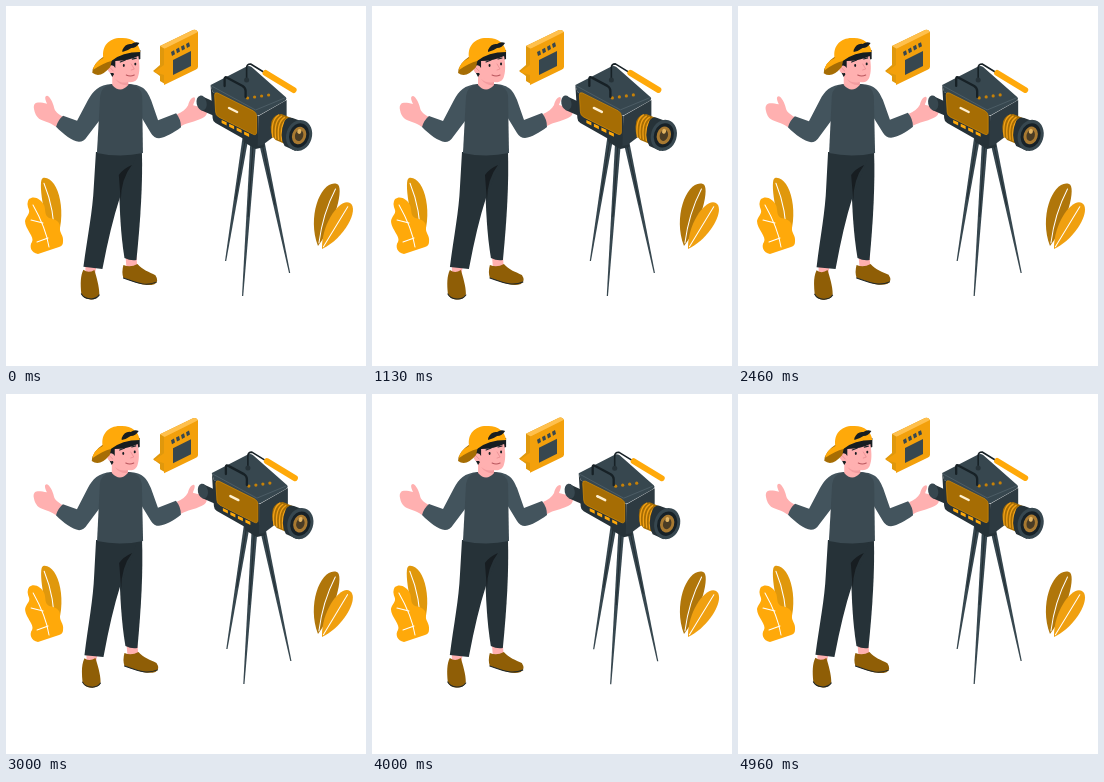
Recreate the animation shown at these times as an HTML page. Size 360x360 px, loop 5 s.

```html
<!DOCTYPE html>
<html lang="en">
<head>
<meta charset="utf-8">
<title>Video maker</title>
<style>
  html, body { margin: 0; width: 100%; height: 100%; overflow: hidden; background: #fff; }
  svg { display: block; width: 100vw; height: 100vh; }
  .amber { fill: #ffa90a; }
  .gold { fill: #e0980c; }
  .brown { fill: #a66d04; }
  .shoe { fill: #8f5e06; }
  .ink { fill: #263238; }
  .slate { fill: #37474f; }
  .shirt { fill: #3b4a52; }
  .sleeve { fill: #43545d; }
  .skin { fill: #ffb0b0; }
  .hair { fill: #171d21; }
  .line { fill: none; stroke-linecap: round; stroke-linejoin: round; }
  .vein { stroke: #fff; stroke-width: 1; }
  .dark { stroke: #1c262b; }
</style>
</head>
<body>
<svg viewBox="0 0 360 360">
  <g id="leftPlant">
    <g id="leftLeaf"></g>
    <path class="amber" d="M23 193C28 189 35 193 38 199C40 204 38 209 43 212C50 213 54 216 54 221C53 227 58 229 57 236Q57 240 53 241L32 248C25 247 23 240 26 236C29 231 19 223 19 215C20 210 24 208 23 204Q20 197 23 193Z"/>
    <path class="line vein" d="M27 199Q40 222 43 241M37 217L25 214M42 232L31 236"/>
  </g>
  <g id="rightPlant"></g>

  <g id="bubble">
    <path class="gold" d="M154 40L187 24Q191 23 192 27L159 78L154 75V70L147 65L154 59Z"/>
    <path fill="#ffc04d" d="M154 40L187 24Q191 23 192 27L159 43Z"/>
    <path fill="#f3a00b" d="M158 43L192 26V61Q192 63 189 64L158 79V69L148 66L158 59Z"/>
    <g class="slate">
      <path d="M167 54L185 45V60L167 69Z"/>
      <g id="slate"></g>
    </g>
  </g>

  <g id="man">
    <path class="skin" d="M80 258L91 260L89 271H80ZM120 249L131 250L132 264L121 262Z"/>
    <path class="shoe" d="M78 264Q83 268 89 264C91 271 94 280 94 288C93 295 79 296 76 288C75 278 75 270 78 264Z"/>
    <path class="shoe" d="M118 259Q125 262 132 258C137 264 144 266 150 269Q154 275 149 278C140 281 130 276 118 272Q116 266 118 259Z"/>
    <path class="line dark" stroke-width="1" d="M76 288C79 294 90 295 94 289M118 272C130 276 140 281 151 276"/>

    <path class="ink" d="M113 146H136C137 176 135 213 131 254Q125 255 119 252C115 228 114 205 113 172Z"/>
    <path class="ink" d="M90 146H131C128 160 119 178 114 192Q105 220 97 263L78 261C82 230 87 205 88 181Z"/>
    <path class="hair" d="M126 159Q117 163 113 169L115 195Q115 173 126 159Z"/>

    <path class="skin" d="M57 111C52 108 49 106 48 102C47 97 44 91 41 90C38 90 39 94 41 98C36 97 31 96 29 98Q27 100 28 104Q29 110 33 113C38 116 43 116 50 121Z"/>
    <path class="sleeve" d="M106 78C92 79 87 85 82 94L71 115L57 110Q52 114 50 121C58 129 66 135 73 136Q78 136 81 131L96 111Z"/>
    <path class="skin" d="M171 108C176 106 180 103 182 99C183 95 185 91 188 91C190 92 188 96 187 99C192 100 198 102 201 105Q201 110 196 112C188 116 182 116 175 120Z"/>
    <path class="sleeve" d="M123 78C138 79 141 85 145 94L152 114L170 107Q175 113 175 121C167 127 160 131 153 132Q148 132 145 127L134 109Z"/>
    <path class="shirt" d="M106 78Q95 80 94 90L91 147Q114 152 137 147L136 90Q135 80 123 78Z"/>
    <path class="skin" d="M106 66V79Q114 88 122 79V70Z"/>
    <path fill="#f39c9f" d="M109 73Q115 78 122 76V79Q114 80 109 73Z"/>

    <path class="hair" d="M101 51Q101 63 106 71L113 60L134 53V44Z"/>
    <path class="skin" d="M109 55Q122 55 132 50C133 56 134 64 132 70C131 75 127 77 122 76C115 75 110 72 107 67C102 68 100 63 103 60Q107 58 109 62Z"/>
    <path class="line" stroke="#e98d91" stroke-width=".8" d="M104 62L107 65M125 58L128 63L125 64"/>
    <path class="line dark" stroke-width="1.2" d="M114 56L119 54M126 53L130 52"/>
    <g class="hair"><ellipse cx="117.5" cy="59.5" rx="1" ry="1.4"/><ellipse cx="129" cy="58" rx="1" ry="1.4"/></g>
    <path class="line" stroke="#b9565d" stroke-width="1" d="M120 69Q124 71 128 69"/>

    <path class="brown" d="M98 50Q86 58 86 67Q94 73 104 61L106 52Z"/>
    <path class="amber" d="M97 52C95 40 103 32 114 32C125 31 133 37 134 46Q116 46 105 55Q97 57 87 64Q87 57 97 52Z"/>
    <path class="hair" d="M116 44Q119 37 125 38Q129 35 133 37Q130 42 125 42Q121 45 116 46Z"/>
  </g>

  <g id="camera">
    <g id="tripod"></g>
    <path class="ink" d="M237 128L258 132L259 141L250 143L238 136Z"/>

    <path class="ink" d="M196 90L211 97V111L195 104Z"/>
    <ellipse class="slate" cx="196" cy="97" rx="5" ry="7.5" transform="rotate(-12 196 97)"/>

    <path class="slate" d="M205 79L240 61Q243 59 246 61L280 91Q282 93 279 95L254 109Q251 110 248 108L207 86Z"/>
    <path class="ink" d="M205 79L207 86L253 110V140L247 138L210 117Q207 115 207 112Z"/>
    <path fill="#2d3a41" d="M253 110L281 94V121L257 139L252 140Z"/>
    <path class="line" stroke="#52636b" stroke-width=".8" d="M206 80L250 104L279 92"/>
    <path class="brown" stroke="#d78c04" stroke-width=".7" d="M209 89Q209 86 212 87L248 105Q251 107 251 110V126Q251 130 247 128L213 111Q210 109 210 106Z"/>
    <path class="line" stroke="#fff0d0" stroke-width="2.4" d="M223.5 102L231.5 106"/>
    <g id="keys" class="amber"></g>
    <g id="dials" fill="#c68108"></g>
    <path class="line" stroke="#172126" stroke-width="2.3" d="M219 80V73Q219 70 222 72L237 80Q240 82 240 85V91"/>
    <path class="line" stroke="#172126" stroke-width="1.6" d="M241 73V62Q241 58 245 58L258 66"/>
    <circle class="ink" cx="241" cy="74" r="2.5"/>
    <path class="line" stroke="#ffa90a" stroke-width="6" d="M260 67L288 84"/>

    <path class="brown" d="M266 115Q269 108 276 108L288 113L282 139L270 134Q263 128 266 115Z"/>
    <g id="grip" class="line" stroke="#f2a116" stroke-width="1.3"></g>
    <path class="ink" d="M279 115Q282 110 287 112L298 116L290 145L279 140Q273 130 279 115Z"/>
    <g id="lens" transform="translate(293.5 129.5) rotate(17)"></g>
  </g>
</svg>

<script>
  const $ = id => document.getElementById(id);
  const add = (id, tag, attrs) => {
    const el = document.createElementNS('http://www.w3.org/2000/svg', tag);
    for (const key in attrs) el.setAttribute(key, attrs[key]);
    $(id).append(el);
  };

  // A leaf from base to tip; left and right set how far each side bulges.
  function leaf(id, fill, x, y, tipX, tipY, left, right) {
    const dx = tipX - x, dy = tipY - y, len = Math.hypot(dx, dy);
    const at = (k, out) => `${x + dx * k - dy / len * out} ${y + dy * k + dx / len * out} `;
    const d = `M${at(0, 0)}C${at(.4, left)}${at(1, left * .8)}${at(1, 0)}C${at(1, right * .8)}${at(.4, right)}${at(0, 0)}Z`;
    add(id, 'path', { d, fill });
    add(id, 'path', { d: `M${at(.92, 0)}Q${at(.5, (left + right) * .5)}${at(.05, 0)}`, class: 'line vein' });
  }

  function leg(x, y, footX, footY) {
    add('tripod', 'path', { class: 'slate', d: `M${x - 3} ${y}H${x + 3}L${footX + .6} ${footY}h-1.2Z` });
    add('tripod', 'path', { class: 'line dark', 'stroke-width': .8,
      d: `M${x} ${y}L${(x + footX) / 2} ${(y + footY) / 2}` });
  }

  leaf('leftLeaf', '#e0980c', 49, 238, 37, 172, -7, 19);
  leaf('rightPlant', '#b0760a', 312, 240, 331, 178, -20, 10);
  leaf('rightPlant', '#f0a010', 316, 243, 344, 197, -14, 14);

  leg(240, 131, 220, 255);
  leg(248, 131, 237, 290);
  leg(255, 131, 284, 267);

  for (let i = 0; i < 4; i++) {
    add('slate', 'path', { d: `M${166 + i * 5} ${50 - i * 2.7}l3 -1.7l-1 -4l-3 1.7Z` });
    add('keys', 'path', { d: `M${216 + i * 7.5} ${114 + i * 3.8}l5 2.3v3.2l-5 -2.5Z` });
    add('grip', 'path', { d: `M${273 + i * 3} ${109 + i * 1.2}q-8 5 -6 22` });
    add('dials', 'circle', { cx: 242 + i * 7, cy: 92 - i, r: 1.6 });
  }

  ['#37474f', '#172127', '#a87931', '#4a3c25'].forEach((fill, i) =>
    add('lens', 'ellipse', { rx: 12.8 - i * 2.9, ry: 15.8 - i * 3.4, fill }));
  add('lens', 'ellipse', { cx: -1, cy: -4, rx: 2, ry: 2.5, fill: '#e2b461' });

  const LOOP = 5000;
  const move = (id, x, y) => $(id).setAttribute('transform', `translate(${x} ${y})`);
  const turn = (id, angle, x, y) => $(id).setAttribute('transform', `rotate(${angle} ${x} ${y})`);

  function draw(now) {
    const wave = cycles => Math.sin(now % LOOP / LOOP * cycles * 2 * Math.PI);
    move('camera', 2.2 * wave(4) - .4, .2 * wave(4));
    move('bubble', 0, .3 * wave(2));
    turn('man', .25 * Math.cos(now / LOOP * 2 * Math.PI), 116, 130);
    turn('leftPlant', .2 * wave(2), 42, 246);
    turn('rightPlant', -.2 * wave(2), 315, 242);
    requestAnimationFrame(() => draw(performance.now()));
  }
  draw(performance.now());
</script>
</body>
</html>
```
